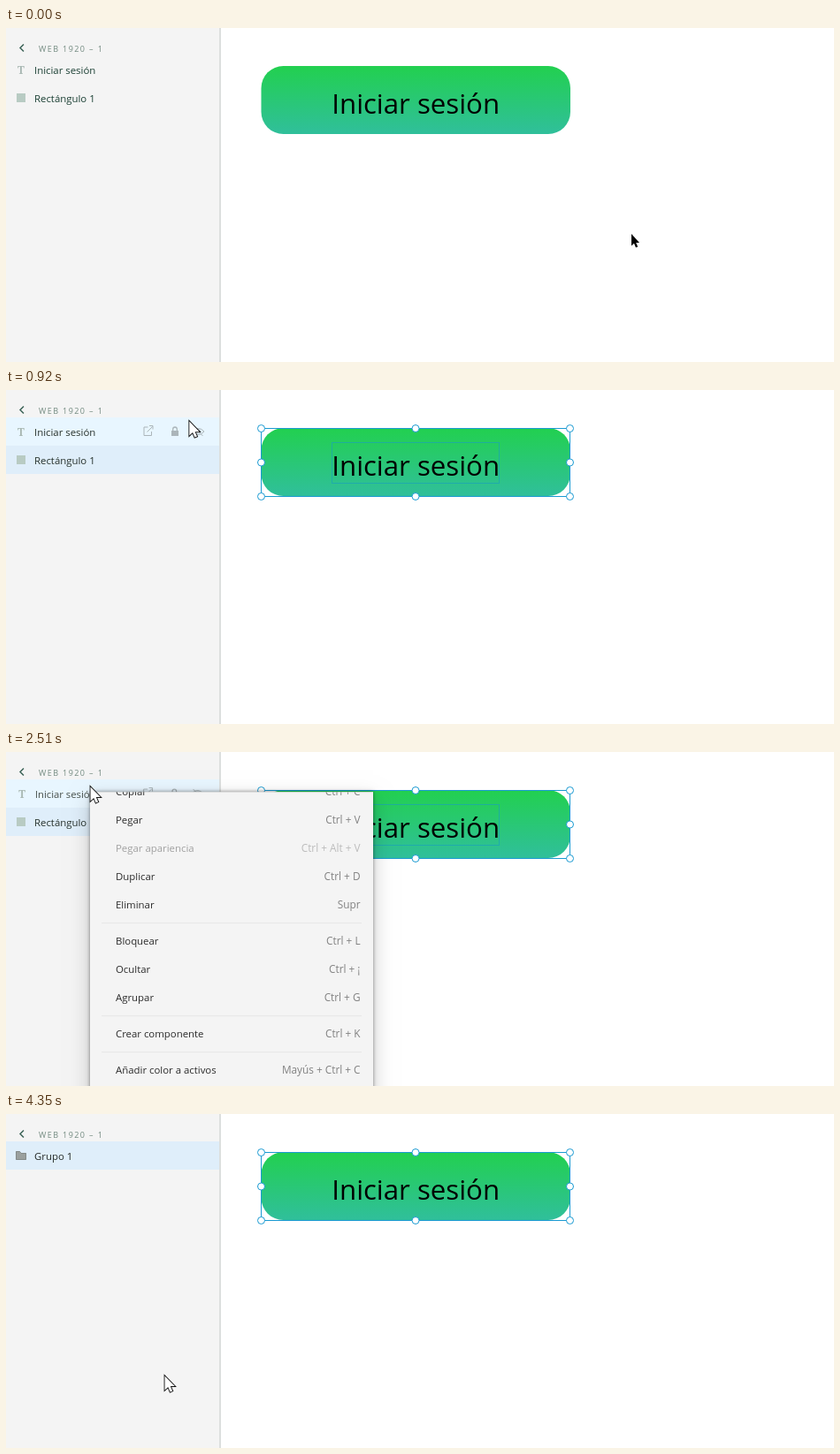
An HTML page with a canvas for the animation above (4550 ms loop, 936 px wide and 378 px high).

```html
<!DOCTYPE html>
<html lang="es">
<head>
<meta charset="utf-8">
<style>
html, body { margin: 0; width: 100%; height: 100%; overflow: hidden; background: #fff; }
canvas { display: block; }
</style>
</head>
<body>
<canvas id="stage" width="936" height="378"></canvas>
<script>
const c = document.getElementById('stage').getContext('2d');
const LOOP = 4550, BLUE = '#1a9ad2', SANS = '"Open Sans", "Noto Sans", sans-serif';

const clamp = v => Math.max(0, Math.min(1, v));
const span = (t, a, b) => clamp((t - a) / (b - a));
const smooth = u => u * u * (3 - 2 * u);
const easeIn = u => u * u;
const easeOut = u => 1 - (1 - u) ** 2;

// Pointer path: time, x, y, easing of the way there
const path = [
  [100, 707, 233, smooth], [610, 407, 37, easeIn], [760, 275, 24, easeOut],
  [810, 275, 24, smooth], [1140, 16, 66, smooth], [1430, 23, 58, smooth],
  [1680, 23, 58, smooth], [2080, 95, 39, smooth], [2780, 95, 39, smooth],
  [3200, 177, 224, smooth], [3300, 177, 227, smooth], [3710, 179, 296, smooth]
];

function pointer(t) {
  const i = path.findIndex(k => k[0] > t);
  if (i === 0) return path[0].slice(1, 3);
  if (i < 0) return path.at(-1).slice(1, 3);
  const [t0, x0, y0] = path[i - 1], [t1, x1, y1, ease] = path[i];
  const u = ease(span(t, t0, t1));
  return [x0 + (x1 - x0) * u, y0 + (y1 - y0) * u];
}

function rect(x, y, w, h, fill) {
  c.fillStyle = fill;
  c.fillRect(x, y, w, h);
}

function text(s, x, y, fill, size = 11.4, align = 'left') {
  c.font = `${size}px ${SANS}`;
  c.textAlign = align;
  c.fillStyle = fill;
  c.fillText(s, x, y);
}

function shape(d, x, y, fill, stroke, width = 1) {
  c.save();
  c.translate(x, y);
  const p = new Path2D(d);
  c.lineWidth = width;
  if (stroke) { c.strokeStyle = stroke; c.stroke(p); }
  if (fill) { c.fillStyle = fill; c.fill(p); }
  c.restore();
}

function disc(x, y, r, fill, stroke) {
  c.beginPath();
  c.arc(x, y, r, 0, 7);
  c.fillStyle = fill;
  c.fill();
  if (stroke) { c.strokeStyle = stroke; c.lineWidth = 1; c.stroke(); }
}

function rowIcons(y) {
  const ink = '#abb5b9';
  shape('M5 2H.5V11.5H9V7M4 7.5L10 1.5M6.5 .5H10.5V4.5', 155.5, y - 7, null, ink);
  shape('M0 4H8V10H0Z', 187, y - 5, ink);
  shape('M1.7 4V2.3a2.3 2.3 0 0 1 4.6 0V4', 187, y - 5, null, ink, 1.3);
  shape('M0 5Q6.5 -2 13 5Q6.5 12 0 5M1.5 0L11.5 10M4.5 5a2 2 0 1 0 4 0a2 2 0 1 0 -4 0', 211, y - 5, null, ink);
}

function sidebar(t, selected, hover, grouped) {
  rect(0, 0, 241, 378, '#f4f4f4');
  rect(241, 0, 2, 378, '#dcdfde');
  shape('M4 0L0 4L4 8', 16, 18.5, null, '#3c6357', 1.5);
  c.letterSpacing = '1.4px';
  text('WEB 1920 – 1', 37, 27, '#71897f', 9);
  c.letterSpacing = '0px';

  if (grouped) {
    rect(0, 31, 241, 32, '#dfeefa');
    shape('M.5 .5H4.5L6 2.5H11.5V9.5H.5Z', 11, 42, '#9ba09e', '#6d7572');
    return text('Grupo 1', 32, 52, '#262c2a');
  }
  const ink = t < 800 ? '#1a3f33' : '#25302b';
  const press = span(t, 2100, 2180) * (1 - span(t, 2430, 2590));
  ['Iniciar sesión', 'Rectángulo 1'].forEach((name, i) => {
    const mid = 47 + 32 * i;
    if (selected[i]) rect(0, mid - 16, 241, 32, hover === i ? '#e8f6ff' : '#dfeefa');
    c.save();
    if (i === 0) {   // contents shrink slightly while pressed
      const k = 1 - .02 * press;
      c.translate(121, mid);
      c.scale(k, k);
      c.translate(-121, -mid);
      c.font = 'bold 12px "Noto Serif", serif';
      c.textAlign = 'center';
      c.fillStyle = '#a9b8b3';
      c.fillText('T', 17, 52);
    } else {
      rect(12, 74, 10, 10, '#b8cbc3');
    }
    text(name, 32, mid + 5, i === 0 && press > .3 ? '#464f4b' : ink);
    if (hover === i) rowIcons(mid);
    c.restore();
  });
}

function button() {
  const g = c.createLinearGradient(0, 43, 0, 120);
  g.addColorStop(0, '#22d04f');
  g.addColorStop(1, '#30bf9b');
  c.fillStyle = g;
  c.beginPath();
  c.roundRect(288.5, 43, 349.5, 77, 25);
  c.fill();
  text('Iniciar sesión', 368.3, 97, '#000', 31.2);
}

function outline(selected, grouped) {
  c.lineWidth = 1;
  if (selected[0] && !grouped) {
    c.strokeStyle = 'rgba(25,160,190,.65)';
    c.strokeRect(368.5, 59.5, 189, 46);
  }
  if (!selected[1]) return;
  c.strokeStyle = BLUE;
  c.strokeRect(288.5, 43.5, 349, 77);
  for (const x of [288.5, 463, 637.5])
    for (const y of [43.5, 82, 120.5])
      if (x !== 463 || y !== 82) disc(x, y, 4, '#fff', BLUE);
}

const items = [
  [63, 'Copiar', 'Ctrl + C'], [95, 'Pegar', 'Ctrl + V'],
  [127, 'Pegar apariencia', 'Ctrl + Alt + V', true],
  [159, 'Duplicar', 'Ctrl + D'], [191, 'Eliminar', 'Supr'],
  [232, 'Bloquear', 'Ctrl + L'], [264, 'Ocultar', 'Ctrl + ¡'],
  [296, 'Agrupar', 'Ctrl + G'], [337, 'Crear componente', 'Ctrl + K'],
  [378, 'Añadir color a activos', 'Mayús + Ctrl + C']
];

function menu(t, y) {
  const open = span(t, 2400, 2750), top = 45 + open;
  c.save();
  c.globalAlpha = span(t, 2390, 2470) * (1 - span(t, 4240, 4345));
  // wide soft shadow, then a tight one at the edge
  for (const [blur, alpha, drop] of [[22, .2, 8], [4, .45, 0]]) {
    c.shadowColor = `rgba(0,0,0,${alpha})`;
    c.shadowBlur = blur;
    c.shadowOffsetY = drop;
    rect(95, top, 320, 380, '#f4f4f4');
  }
  c.shadowColor = 'transparent';
  c.beginPath();
  c.rect(95, top, 320, 340);
  c.clip();
  c.translate(0, -56 * (1 - open) ** 3);
  for (const [mid, name, keys, off] of items) {
    const over = t > 2800 && !off && Math.abs(y - mid) < 16;
    if (over) rect(96, mid - 15, 318, 30, t >= 4120 ? '#e4e4e4' : '#eeeeee');
    text(name, 124, mid + 4, off ? '#a0a0a0' : over ? '#000' : '#2b2b2b');
    text(keys, 400.5, mid + 4, off ? '#bcbcbc' : over ? '#000' : '#828282', 11.8, 'right');
  }
  for (const line of [211, 316, 357]) rect(108, line, 294, 1, '#e6e6e6');
  c.restore();
}

function draw(t) {
  const [x, y] = pointer(t);
  const dragging = t >= 50 && t < 790;
  const [sx, sy] = pointer(t - 7);
  const selected = [
    t > 760 || sx < 558 && sy < 106,
    t > 760 || sx < 638 && sy < 120
  ];
  const grouped = t >= 4290;
  const inList = t > 850 && t < 2650 && x < 241 && y > 31;
  const hover = inList ? (y < 63 ? 0 : 1) : -1;

  rect(0, 0, 936, 378, '#fff');
  sidebar(t, selected, hover, grouped);
  button();
  outline(selected, grouped);

  if (dragging && sx < 706) {
    rect(sx, sy, 706 - sx, 230 - sy, 'rgba(26,136,231,.21)');
    rect(sx - 1, sy, 1, 230 - sy, '#fff');
  }
  if (t > 2390 && t < 4345) menu(t, y);

  if (t < 1200 && x > 242)
    shape('M0 0V13.5L3 10.8L5 15.5L7.2 14.6L5.2 10H9Z', x, y, '#000', '#fff', 1.5);
  else
    shape('M.5 .5V16.5L4.2 13L6.6 18.5L9.2 17.4L6.8 12.1H11.8Z', x, y, '#fff', '#111', 1.8);

  if (dragging || t >= 2110 && t < 2265 || t >= 4120 && t < 4270)
    disc(x, y, 12, 'rgba(255,255,0,.5)');
}

function tick() {
  draw(performance.now() % LOOP);
  requestAnimationFrame(tick);
}
tick();
</script>
</body>
</html>
```
